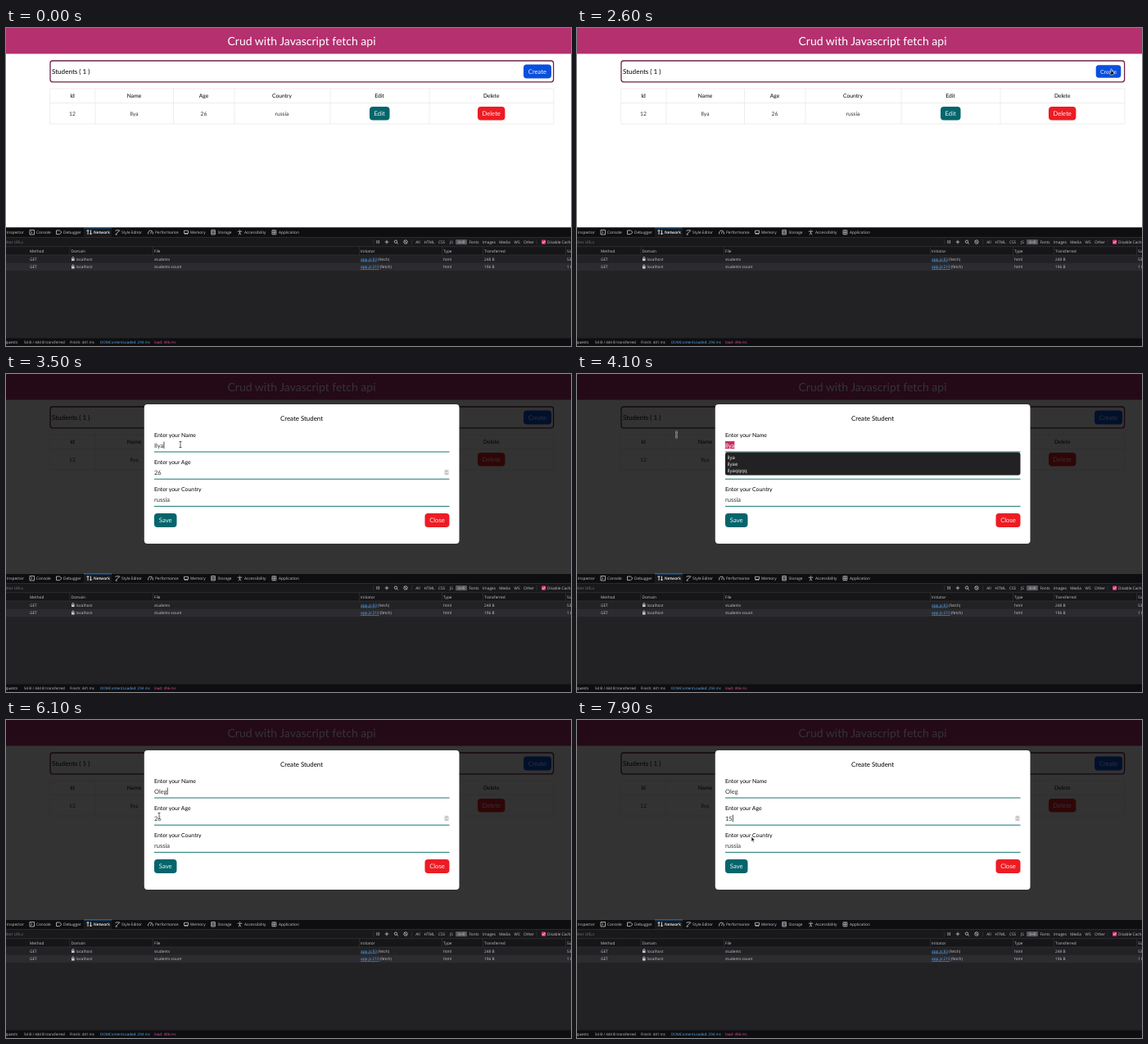
These frames come from a looping animation (690 px wide and 388 px high, 8 s). An HTML page:

```html
<!DOCTYPE html>
<html lang="en">
<head>
<meta charset="utf-8">
<title>Crud with Javascript fetch api</title>
<style>
  html, body { margin: 0; width: 100%; height: 100%; overflow: hidden; background: #fff; }
  svg { display: block; width: 690px; height: 388px; }
  text { text-rendering: geometricPrecision; white-space: pre; }
  .page { font: 6.7px Lato, sans-serif; fill: #111; }
  .mid { text-anchor: middle; }
  .btn { font-size: 7.7px; fill: #fff; fill-opacity: .92; text-anchor: middle; }
  .label { font-size: 6.9px; fill: #000; }
  .value { font-size: 7.5px; fill: #333; }
  .grid { fill: none; stroke: #e9e9e9; stroke-width: .8; }
  .teal { fill: #04656c; }
  .red { fill: #ec1c24; }
  .blue { fill: #0a50dd; }
  .under { stroke: #16786f; stroke-width: 1; }
  .tools { font: 4.75px "Open Sans", sans-serif; fill: #c9c9cd; }
  .icon { fill: none; stroke: #c9c9cd; stroke-width: .8; }
  .menu { font: 6px "Open Sans", sans-serif; fill: #f4f4f4; }
  .caret { fill: #222; }
</style>
</head>
<body>
<svg viewBox="0 0 690 388">
  <rect width="690" height="388" fill="#fff"/>

  <g class="page">
    <rect width="690" height="31.5" fill="#b4306f"/>
    <text class="mid" x="361" y="21" style="font-size:14px;fill:#fff">Crud with Javascript fetch api</text>

    <rect x="54" y="40" width="614.6" height="25.8" rx="3" fill="#fff" stroke="#6f2449" stroke-width="1.3"/>
    <text x="56" y="56" style="font-size:8.1px;fill:#000">Students ( 1 )</text>
    <g id="create">
      <rect class="blue" x="632" y="44.5" width="34" height="17" rx="4"/>
      <text class="btn" x="649" y="55.8">Create</text>
    </g>

    <path class="grid" d="M53.6 74H668.8V117H53.6ZM53.6 91.5H668.8M109 74V117M204.500 74V117M279 74V117M396 74V117M517 74V117"/>
    <g id="cells" class="mid"></g>
    <rect class="teal" x="444" y="96" width="24.5" height="16.600" rx="4"/>
    <text class="btn" x="456.2" y="107">Edit</text>
    <rect class="red" x="576" y="96" width="33.4" height="16.600" rx="4"/>
    <text class="btn" x="592.7" y="107">Delete</text>
  </g>

  <g id="modal" class="page">
    <rect width="690" height="243.500" fill="#000" fill-opacity=".8"/>
    <rect x="168.8" y="37" width="384.700" height="170" rx="4" fill="#fff"/>
    <text class="mid" x="361" y="56.600" style="font-size:7.9px;fill:#000">Create Student</text>
    <text class="label" x="181" y="76.500">Enter your Name</text>
    <text class="label" x="181" y="109.700">Enter your Age</text>
    <text class="label" x="181" y="143">Enter your Country</text>
    <path class="under" d="M181 95H541.500M181 128.200H541.500M181 161.400H541.500"/>
    <rect id="nameSel" x="181" y="82" height="9.200" fill="#cb2f62"/>
    <rect id="ageSel" x="181" y="115.200" height="9.200" fill="#cb2f62"/>
    <text id="name" class="value" x="181" y="89.500"></text>
    <text id="age" class="value" x="181" y="122.700"></text>
    <text class="value" x="181" y="156">russia</text>
    <rect id="nameCaret" class="caret" y="82.500" width=".8" height="8.500"/>
    <rect id="ageCaret" class="caret" y="115.700" width=".8" height="8.500"/>
    <rect x="535" y="116.500" width="6" height="7" rx="1" fill="#e3e3e3"/>
    <path d="M536.500 119.300L538 117.800L539.500 119.300M536.500 120.900L538 122.400L539.500 120.900" fill="none" stroke="#777" stroke-width=".7"/>
    <rect class="teal" x="181" y="170" width="27.500" height="17" rx="4"/>
    <text class="btn" x="194.700" y="181.300">Save</text>
    <rect class="red" x="511.500" y="170" width="30" height="17" rx="4"/>
    <text class="btn" x="526.500" y="181.300">Close</text>
    <g id="menu" class="menu">
      <rect x="181" y="95.500" width="360.500" height="28" rx="3" fill="#222224"/>
      <text x="183.500" y="103.700">ilya</text>
      <text x="183.500" y="111.900">ilyae</text>
      <text x="183.500" y="120.100">ilyaqqqq</text>
    </g>
  </g>

  <g class="tools">
    <rect y="243.500" width="690" height="144.500" fill="#222225"/>
    <rect y="243.500" width="690" height="12" fill="#0e0e10"/>
    <rect x="95" y="243.500" width="34" height="12" fill="#19191c"/>
    <rect x="95" y="243.300" width="34" height="1" fill="#1683e0"/>
    <rect y="255.500" width="690" height="11" fill="#19191b"/>
    <rect y="266.800" width="690" height="10.200" fill="#161618"/>
    <rect y="286.700" width="690" height="9.500" fill="#2c2c30"/>
    <rect y="378.500" width="690" height="9.500" fill="#0e0e10"/>
    <path d="M0 255.500H690M0 266.700H690M0 277H690M78 267V277M179.500 267V277M431.500 267V277M532.500 267V277M582.500 267V277M683.500 267V277M448.500 258V264.500M495.500 258V264.500M648 258V264.500" stroke="#38383d" stroke-width=".6"/>
    <rect x="549" y="258" width="14" height="6.300" rx="1" fill="#55555b"/>
    <g id="labels"></g>
    <g class="icon">
      <path d="M29 246.500H34.500V252H29ZM30.500 248L32 249.300L30.500 250.600"/>
      <path d="M61.500 247H65.500L68 249.300L65.500 251.600H61.500Z"/>
      <path d="M100 252V246.500L98.500 248M100 246.500L101.500 248M103.500 246.500V252L102 250.500M103.500 252L105 250.500" stroke="#fff"/>
      <path d="M133.500 247.500L135 246.800H138L139.300 247.500M134 251.500L138.500 247.500M133.500 252H136"/>
      <path d="M173.800 251.500A3 3 0 1 1 179.200 251.500M176.500 251L177.500 248.500"/>
      <path d="M217.500 247.300H222.500V250.500H217.500ZM218.500 250.500V252M220 250.500V252M221.500 250.500V252"/>
      <path d="M250.800 246.500H255.300V252H250.800ZM250.800 248.300H255.300M250.800 250.200H255.300"/>
      <path d="M282.800 248.200H288.200M285.500 248.200V250L284 252.300M285.500 250L287 252.300M285.500 246.200V247.200"/>
      <path d="M325 246.800H329.800V251.800H325ZM327.400 246.800V251.800M325 249.300H329.800"/>
      <path d="M453 259V263M455.300 259V263M465 258.800V263.400M462.700 261.100H467.300M477.300 262L479 263.600"/>
      <circle cx="476" cy="260.700" r="1.700"/>
      <circle cx="488" cy="261" r="2.200"/><path d="M486.500 259.500L489.500 262.500"/>
    </g>
    <rect x="654" y="258.500" width="5.200" height="5.200" rx="1" fill="#e0397f"/>
    <path d="M655.200 261.200L656.300 262.300L658.200 259.800" fill="none" stroke="#fff" stroke-width=".8"/>
    <g id="locks"></g>
  </g>

  <g id="cursor">
    <path id="arrow" d="M0 0V6L1.400 4.900L2.300 7L3.300 6.500L2.400 4.500L4.200 4.300Z" fill="#111" stroke="#fff" stroke-width=".6"/>
    <path id="hand" d="M-.6 0H.6V2.600L3 3.200V5.400L2.200 7H-1L-2.600 4.300L-1.900 3.700L-.6 4.700Z" fill="#111" stroke="#fff" stroke-width=".6"/>
    <g id="beam" fill="none">
      <path d="M-1.500 -3.500H1.500M0 -3.500V3.500M-1.500 3.500H1.500" stroke="#fff" stroke-width="1.600"/>
      <path d="M-1.500 -3.500H1.500M0 -3.500V3.500M-1.500 3.500H1.500" stroke="#222" stroke-width=".7"/>
    </g>
  </g>
</svg>

<script>
const LOOP = 8000, STEP = 100;
const $ = id => document.getElementById(id);

function put(parent, tag, attrs, content = "") {
  const el = document.createElementNS("http://www.w3.org/2000/svg", tag);
  for (const key in attrs) el.setAttribute(key, attrs[key]);
  el.textContent = content;
  $(parent).append(el);
  return el;
}

const columns = [81, 156.5, 241.5, 337, 456, 592.7];
["Id", "Name", "Age", "Country", "Edit", "Delete"].forEach((s, i) =>
  put("cells", "text", { x: columns[i], y: 85.4, fill: "#000" }, s));
["12", "Ilya", "26", "russia"].forEach((s, i) =>
  put("cells", "text", { x: columns[i], y: 106.7, fill: "#333" }, s));

const label = (x, y, s, attrs = {}) => put("labels", "text", { x, y, ...attrs }, s);
const row = (y, items, attrs) => items.forEach(([x, s]) => label(x, y, s, attrs));

row(251, [[1, "Inspector"], [37, "Console"], [70, "Debugger"], [141, "Style Editor"],
  [182, "Performance"], [225, "Memory"], [258.5, "Storage"], [291, "Accessibility"], [333, "Application"]]);
label(107, 251, "Network", { fill: "#fff", "font-weight": 600 });
label(-2.5, 262.8, "Filter URLs", { fill: "#77777c" });
row(262.8, [[503, "All"], [517, "HTML"], [532, "CSS"], [544, "JS"], [556, "XHR"], [571.5, "Fonts"],
  [590, "Images"], [609, "Media"], [624, "WS"], [638.5, "Other"]], { class: "mid" });
label(661, 262.8, "Disable Cache");
row(273.8, [[29, "Method"], [79.5, "Domain"], [181, "File"], [433, "Initiator"], [534, "Type"],
  [584, "Transferred"], [685, "Size"]]);

function request(y, file, link, sent, size) {
  row(y, [[29, "GET"], [85.5, "localhost"], [181, file], [534, "html"], [584, sent], [685, size]]);
  const a = label(433, y, link, { fill: "#5aaeff", "text-decoration": "underline" });
  label(433 + a.getComputedTextLength(), y, " (fetch)");
  put("locks", "rect", { x: 80, y: y - 2.4, width: 3.6, height: 2.8, fill: "#c9c9cd" });
  put("locks", "path", { d: `M80.700 ${y - 2.2}v-1a1.100 1.100 0 0 1 2.200 0v1`, class: "icon" });
}
request(283.7, "students", "app.js:83", "248 B", "53 B");
request(293.2, "students-count", "app.js:210", "196 B", "1 B");

label(-5, 385, "requests");
label(22, 385, "54 B / 444 B transferred", { "font-size": 4.5 });
label(78, 385, "Finish: 441 ms", { "font-size": 4.5 });
label(115, 385, "DOMContentLoaded: 294 ms", { fill: "#5aaeff", "font-size": 4.5 });
label(181, 385, "load: 496 ms", { fill: "#f0509f", "font-size": 4.5 });

// Pointer waypoints: time, x, y
const path = [
  [700, 476, 128], [800, 352, 112], [900, 352, 112], [1000, 306, 106], [1200, 420, 98],
  [1500, 624, 67], [1800, 631, 60], [2100, 646, 52], [2600, 652.5, 50], [2700, 645, 53],
  [2900, 570, 90], [3200, 290, 162], [3500, 213, 86], [3700, 213, 86], [3800, 213.5, 86],
  [3900, 213.5, 86], [4000, 165, 82], [4100, 121.5, 74], [5700, 121.5, 74], [5800, 106, 66],
  [6100, 187, 117], [6300, 190, 119], [6500, 172, 117], [7100, 172, 117], [7800, 213, 142.3], [8000, 213, 142.3]
];
const names = [[0, "Ilya"], [4900, "O"], [5000, "Ol"], [5100, "Ole"], [5200, "Oleg"]];
const ages = [[0, "26"], [6600, "1"], [6800, "15"]];

// Spans of time in which each part is shown
const shown = {
  modal: [[2700, LOOP]],
  menu: [[4000, 4900]],
  nameSel: [[4000, 4900]],
  ageSel: [[6400, 6600]],
  nameCaret: [[3500, 4000], [4900, 5400], [5900, 6300]],
  ageCaret: [[6300, 6400], [6600, 7300], [7800, LOOP]],
  arrow: [[700, 1900], [2700, 3400], [7300, LOOP]],
  hand: [[1900, 2700]],
  beam: [[3400, 4900], [5700, 6600], [7100, 7300]]
};

const latest = (list, t) => list.filter(([at]) => at <= t).pop()[1];

function pointAt(t) {
  const i = path.findIndex(p => p[0] > t);
  if (i < 1) return path[0].slice(1);
  const [t0, x0, y0] = path[i - 1], [t1, x1, y1] = path[i];
  const k = (t - t0) / (t1 - t0);
  return [x0 + (x1 - x0) * k, y0 + (y1 - y0) * k];
}

function field(id, text, selected) {
  const el = $(id);
  el.textContent = text;
  el.style.fill = selected ? "#fff" : "";
  const width = el.getComputedTextLength();
  $(id + "Sel").setAttribute("width", width);
  $(id + "Caret").setAttribute("x", 181.2 + width);
}

function draw(t) {
  const isOn = id => shown[id].some(([from, to]) => t >= from && t < to);
  for (const id in shown) $(id).style.display = isOn(id) ? "" : "none";
  field("name", latest(names, t), isOn("nameSel"));
  field("age", latest(ages, t), isOn("ageSel"));
  $("cursor").setAttribute("transform", `translate(${pointAt(t)})`);
  const pressed = t >= 2600 && t < 2700;
  $("create").setAttribute("transform", pressed ? "translate(649 53) scale(.9) translate(-649 -53)" : "");
}

function tick() {
  draw(Math.floor(performance.now() % LOOP / STEP) * STEP);
  requestAnimationFrame(tick);
}
tick();
</script>
</body>
</html>
```
